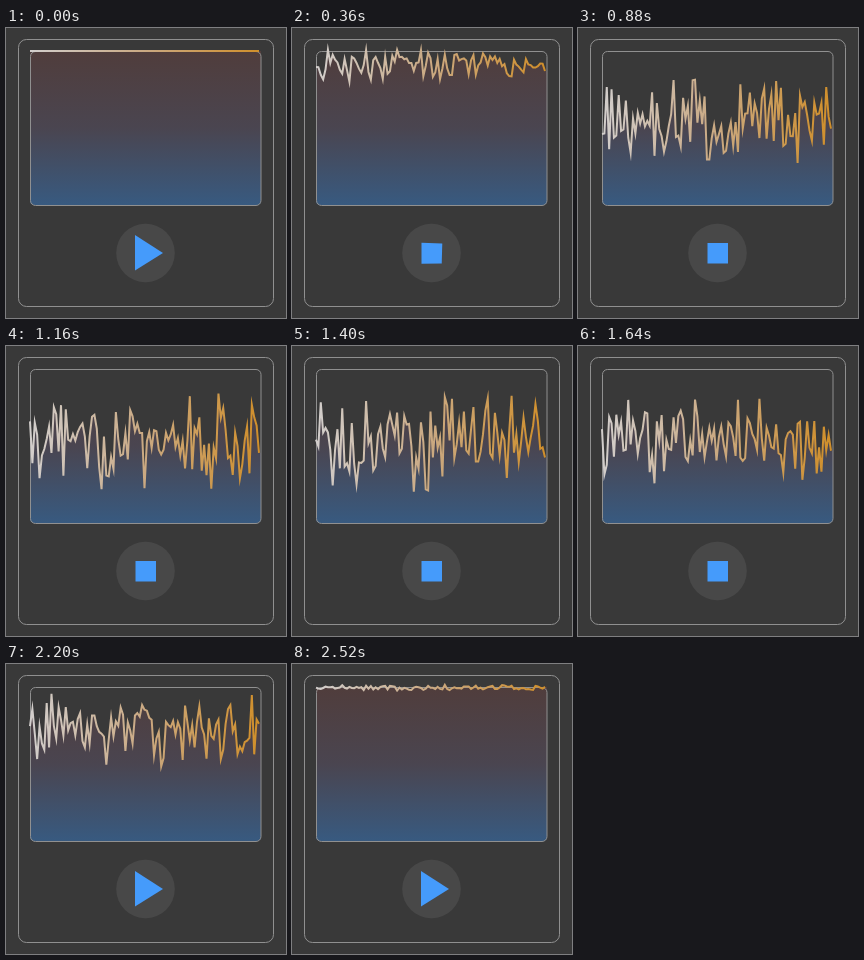
Write an HTML page with a canvas that moves like this. It is 280x290 px and loops after 2560 ms.

```html
<!DOCTYPE html>
<html lang="en">
<head>
<meta charset="utf-8">
<title>Sound recorder</title>
<style>
html, body { margin: 0; width: 100%; height: 100%; overflow: hidden; background: #393939; }
canvas { display: block; }
</style>
</head>
<body>
<canvas id="stage" width="280" height="290"></canvas>
<script>
const ctx = document.getElementById('stage').getContext('2d');
const LOOP = 2560, STEP = 40;
const LEFT = 24, RIGHT = 253, TOP = 23, BOTTOM = 177, SAMPLES = 96;

// Matching corners of the two button icons.
const SQUARE = [[129.5, 215], [150, 215], [150, 235.5], [129.5, 235.5]];
const TRIANGLE = [[129, 207], [157, 225], [143, 233.8], [129, 242.5]];

const ramp = (t, from, to) => Math.min(1, Math.max(0, (t - from) / (to - from)));
const ease = p => (1 - Math.cos(Math.PI * p)) / 2;
const mix = (a, b, p) => a + (b - a) * p;

function randomFrom(seed) {
  let s = Math.imul(seed + 1, 2654435761) >>> 0;
  return () => {
    s = (s + 0x6D2B79F5) >>> 0;
    let n = Math.imul(s ^ (s >>> 15), s | 1);
    n ^= n + Math.imul(n ^ (n >>> 7), n | 61);
    return ((n ^ (n >>> 14)) >>> 0) / 4294967296;
  };
}

function gradient(x0, y0, x1, y1, colors) {
  const g = ctx.createLinearGradient(x0, y0, x1, y1);
  colors.forEach((c, i) => g.addColorStop(i / (colors.length - 1), c));
  return g;
}

const fillColor = gradient(0, TOP, 0, BOTTOM, ['#503d3c', '#4a4550', '#385a80']);
const lineColor = gradient(LEFT, 0, RIGHT, 0, ['#d2cecc', '#caa982', '#d08f2b']);

function strokeBox(x, y, w, h, r) {
  ctx.beginPath();
  ctx.roundRect(x, y, w, h, r);
  ctx.lineWidth = 1;
  ctx.strokeStyle = '#909090';
  ctx.stroke();
}

function tracePoints(points) {
  ctx.beginPath();
  points.forEach(([x, y]) => ctx.lineTo(x, y));
}

function wavePoints(t) {
  const level = ease(ramp(t, 100, 1000)) * (1 - ease(ramp(t, 1920, LOOP)));
  const center = TOP + 72 * level;
  const swing = 52 * Math.pow(level, 0.6);
  const random = randomFrom(Math.round(t / STEP));
  return Array.from({ length: SAMPLES + 1 }, (_, i) => {
    const v = (random() * 0.65 + random() * 0.35) * 2 - 1;
    return [mix(LEFT, RIGHT, i / SAMPLES), center + swing * v];
  });
}

function drawWave(t) {
  const points = wavePoints(t);
  ctx.save();
  ctx.beginPath();
  ctx.roundRect(LEFT, TOP - 4, 231, BOTTOM - TOP + 4, 4);
  ctx.clip();
  tracePoints([...points, [255, points[SAMPLES][1]], [255, BOTTOM], [LEFT, BOTTOM]]);
  ctx.fillStyle = fillColor;
  ctx.fill();
  ctx.restore();

  strokeBox(24.5, 23.5, 230.5, 154, 5);

  tracePoints(points);
  ctx.lineWidth = 2;
  ctx.strokeStyle = lineColor;
  ctx.stroke();
}

function drawButton(t) {
  ctx.fillStyle = '#484848';
  ctx.beginPath();
  ctx.arc(139.5, 225, 29.3, 0, 2 * Math.PI);
  ctx.fill();
  const stop = ease(ramp(t, 80, 400)) * (1 - ease(ramp(t, 1760, 2080)));
  tracePoints(TRIANGLE.map(([x, y], i) => [mix(x, SQUARE[i][0], stop), mix(y, SQUARE[i][1], stop)]));
  ctx.fillStyle = '#459bfb';
  ctx.fill();
}

function draw(t) {
  ctx.fillStyle = '#393939';
  ctx.fillRect(0, 0, 280, 290);
  strokeBox(12.5, 11.5, 255, 267, 8);
  drawWave(t);
  drawButton(t);
}

const start = performance.now();
function tick() {
  const t = (performance.now() - start) % LOOP;
  draw(Math.floor(t / STEP) * STEP);
  requestAnimationFrame(tick);
}
tick();
</script>
</body>
</html>
```
